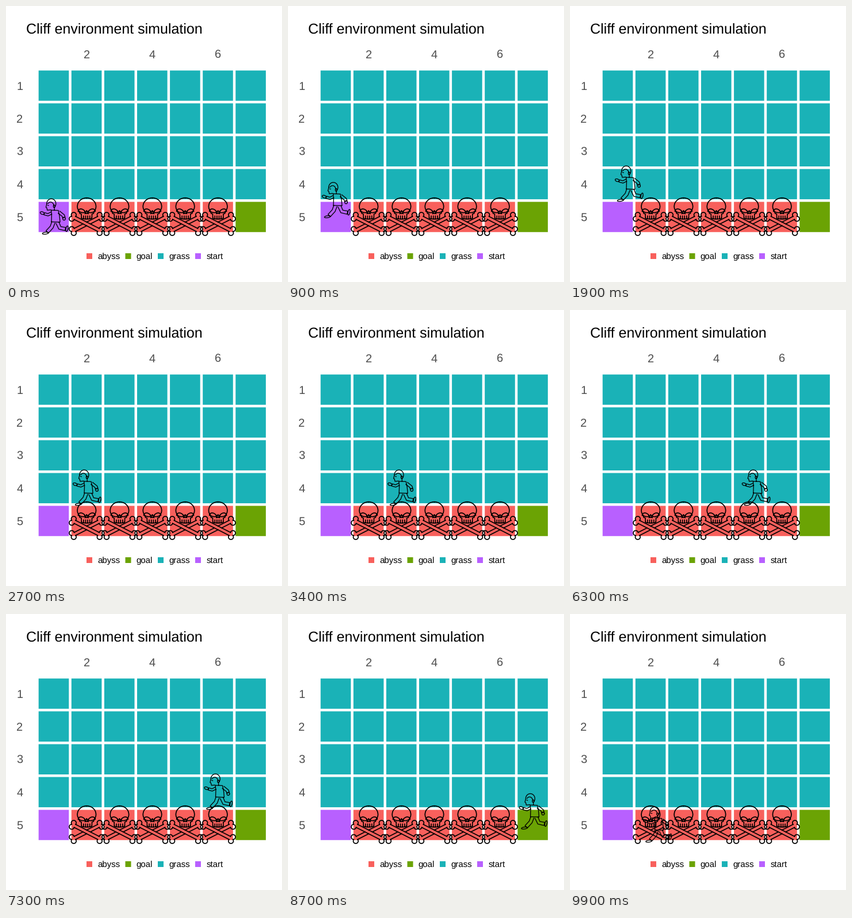
A matplotlib script that plays this animation: 480 by 480 pixels, repeating every 10 s.

```python
import numpy as np
import matplotlib.pyplot as plt
from matplotlib.animation import FuncAnimation
from matplotlib.patches import PathPatch, Rectangle
from matplotlib.path import Path
from matplotlib.transforms import Affine2D

plt.rcParams["font.family"] = "Liberation Sans"
plt.rcParams["text.hinting"] = "none"

SIZE, DPI = 480, 72
PITCH, TILE = 57.1, 52.6
COLORS = {"abyss": "#F8605C", "goal": "#6BA304",
          "grass": "#1AB2B7", "start": "#B860FF"}
FRAMES = 100

fig = plt.figure(figsize=(SIZE / DPI, SIZE / DPI), dpi=DPI, facecolor="white")
ax = fig.add_axes([0, 0, 1, 1])
ax.set_xlim(0, SIZE)
ax.set_ylim(SIZE, 0)
ax.axis("off")


def cell(col, row):
    return 83 + PITCH * (col - 1), 138.5 + PITCH * (row - 1)


def line(*points):
    return Path(points)


def arc(x, y, rx, ry, start=0, end=360, tilt=0):
    shape = Affine2D().scale(rx, ry).rotate_deg(tilt).translate(x, y)
    return Path.arc(start, end).transformed(shape)


def tube(points, radius):
    """Outline of a jointed limb, open where it meets the body."""
    p = np.array(points, float)
    step = np.diff(p, axis=0)
    step /= np.hypot(*step.T)[:, None]
    along = np.vstack([step[0], step[:-1] + step[1:], step[-1]])
    along /= np.hypot(*along.T)[:, None]
    side = radius * along[:, ::-1] * [-1, 1]
    return Path(np.vstack([p + side, (p - side)[::-1]]))


def mirror(parts, flips):
    return [part.transformed(Affine2D().scale(*flip))
            for part in parts for flip in flips]


def crossbones(tilt=27, width=2.9, lobe=4.3, length=27.2):
    """Four bone ends around a crossing where one bone lies on top."""
    a = np.radians(tilt)
    spread = lobe * 0.9
    neck = length - lobe * 0.97
    end = [
        line((width / np.tan(a), -width), (neck, -width)),
        line((width * np.tan(a), width), (neck, width)),
        arc(length, spread, lobe, lobe, -64, 193),
        arc(length, -spread, lobe, lobe, 167, 424),
    ]
    end = [part.transformed(Affine2D().rotate_deg(tilt)) for part in end]
    notch_x, notch_y = width / np.sin(a), width / np.cos(a)
    over = line((0, -notch_y), (notch_x, 0))
    return (mirror(end, [(1, 1), (-1, 1), (1, -1), (-1, -1)])
            + mirror([over], [(1, 1), (-1, -1)]))


def skull_path():
    half = [
        arc(0, -17.5, 16.2, 14.8, -90, 38),
        line((12.8, -8.4), (12, -5.2), (9.3, -4.4), (9, 2.8)),
        Path([(3, -9), (6, -13), (13, -15.8), (15, -9), (9, -6.4), (3, -5),
              (3, -9)], [Path.MOVETO] + [Path.CURVE4] * 6),
        line((0, -10), (3.1, -4.7), (0, -5.5)),
    ]
    half += [line((x, -1), (x, 4.5 - 0.02 * x * x)) for x in (1.8, 5.4)]
    bottom = arc(0, 2.6, 9, 2, 0, 180)
    bones = [part.transformed(Affine2D().translate(0, 13))
             for part in crossbones()]
    return Path.make_compound_path(*mirror(half, [(1, 1), (-1, 1)]),
                                   bottom, *bones)


def runner_path():
    return Path.make_compound_path(
        # head
        arc(-4.2, -23, 8, 8.6, 180, 395),
        arc(-5.5, -19.5, 5.5, 6.4, 215, 360),
        line((-12, -23), (-13.6, -16.8), (-12, -15.8), (-11.2, -11.8),
             (-5, -12.4)),
        arc(0.8, -18.6, 1.5, 2.2),
        line((-10.6, -20.3), (-8.8, -20)),
        line((1, -17), (1.2, -12)),
        # body
        line((-4, 8.5), (-3.6, -3), (-4.4, -11.8), (8, -11.4), (10, -2),
             (11, 9), (-4, 8.5)),
        # arms
        tube([(-4, -6.8), (-10, -3.8), (-16.5, -5.6)], 2),
        arc(-20, -6.8, 3.6, 2.2, tilt=20),
        tube([(9, -8.4), (16.6, -2.4), (17.6, 1)], 2.3),
        arc(18, 3, 2.3, 2.6),
        # legs
        tube([(-0.6, 9.5), (-3.6, 17.6), (-11.3, 26)], 2.9),
        arc(-14.5, 28.2, 5.2, 1.7, tilt=-8),
        tube([(6.5, 10), (10.6, 19), (20.2, 21)], 2.8),
        arc(23, 20.4, 1.8, 5, tilt=12))


def outline(path, width, zorder):
    return ax.add_patch(PathPatch(path, fill=False, ec="black", lw=width,
                                  capstyle="round", joinstyle="round",
                                  zorder=zorder))


def kind(col, row):
    if row < 5:
        return "grass"
    return {1: "start", 7: "goal"}.get(col, "abyss")


def square(x, y, side, name):
    ax.add_patch(Rectangle((x - side / 2, y - side / 2), side, side,
                           fc=COLORS[name], lw=0, snap=False))


def label(x, y, text, size, color="black", ha="left"):
    ax.text(x, y, text, size=size, color=color, ha=ha, va="baseline")


for row in range(1, 6):
    for col in range(1, 8):
        square(*cell(col, row), TILE, kind(col, row))
    label(24, cell(1, row)[1] + 7.3, str(row), 20, "#4D4D4D", "center")
for col in (2, 4, 6):
    label(cell(col, 1)[0], 91, str(col), 20, "#4D4D4D", "center")
label(35.2, 48, "Cliff environment simulation", 25)
for x, name in zip((145, 212.5, 269, 334), COLORS):
    square(x, 435, 10, name)
    label(x + 14.3, 440, name, 15)

skull = skull_path()
for col in range(2, 7):
    x, y = cell(col, 5)
    outline(skull.transformed(Affine2D().translate(x + 0.2, y - 0.9)), 1.7, 3)
runner = outline(runner_path(), 1.3, 4)

# Up from the start, along the cliff edge, down to the goal, then back.
stops = [(1, 5), *((col, 4) for col in range(1, 8)), (7, 5), (1, 5)]
legs = np.arange(len(stops) - 1)
departures = np.round(6 + 11.13 * legs)
arrivals = 12 + 11 * legs
times = np.r_[0, np.column_stack([departures, arrivals]).ravel()]
cols, rows = np.repeat(stops, 2, axis=0)[:-1].T


def update(frame):
    x, y = cell(np.interp(frame, times, cols), np.interp(frame, times, rows))
    runner.set_transform(Affine2D().translate(x, y) + ax.transData)
    return (runner,)


anim = FuncAnimation(fig, update, frames=FRAMES, interval=100, repeat=True,
                     repeat_delay=0, blit=False)
plt.show()
```
